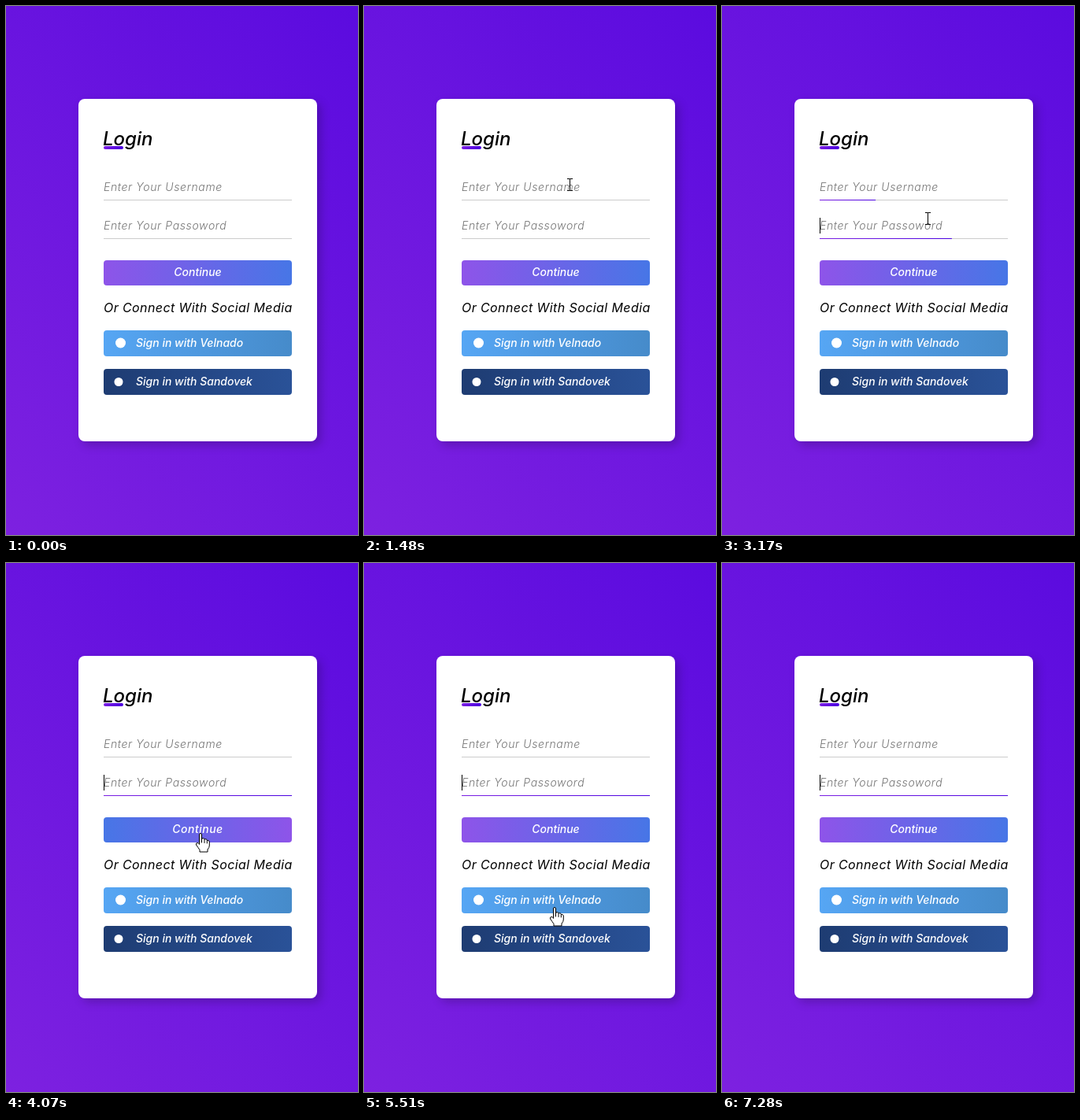
Recreate the animation shown at these times as an HTML page. Size 447 px wide and 672 px high, loop 7.42 s.

```html
<!DOCTYPE html>
<html lang="en">
<head>
<meta charset="utf-8">
<title>Login</title>
<style>
  html, body { margin: 0; width: 100%; height: 100%; overflow: hidden; }
  body { background: linear-gradient(45deg, #7d21e0, #5b0bdf); }
  svg { display: block; width: 447px; height: 672px; }
  text { font: italic 500 14px Inter, "Open Sans", sans-serif; fill: #fff; }
  .title { font-size: 24px; fill: #000; }
  .hint { font-weight: 300; fill: #757575; letter-spacing: .63px; }
  .social { font-size: 16px; font-weight: 400; fill: #000; letter-spacing: .41px; }
  .card { fill: #fff; filter: drop-shadow(5px 5px 6px rgba(0, 0, 0, .2)); }
  .shape { fill: #fff; stroke: #000; stroke-linejoin: round; stroke-linecap: round; }
</style>
</head>
<body>
<svg viewBox="0 0 447 672">
  <defs>
    <linearGradient id="line"><stop stop-color="#7a1fe2"/><stop offset="1" stop-color="#4a00e0"/></linearGradient>
    <linearGradient id="idle"><stop stop-color="#8e54e9"/><stop offset="1" stop-color="#4776e6"/></linearGradient>
    <linearGradient id="over"><stop stop-color="#4776e6"/><stop offset="1" stop-color="#8e54e9"/></linearGradient>
    <linearGradient id="sky"><stop stop-color="#56a6f4"/><stop offset="1" stop-color="#468bca"/></linearGradient>
    <linearGradient id="navy"><stop stop-color="#1e3c72"/><stop offset="1" stop-color="#2a5298"/></linearGradient>
  </defs>

  <rect class="card" x="92" y="118" width="303" height="435" rx="8"/>
  <rect x="124" y="178" width="25" height="4" rx="2" fill="url(#line)"/>
  <text class="title" x="123" y="177">Login</text>

  <text class="hint" x="124" y="235">Enter Your Username</text>
  <rect x="124" y="246" width="239" height="1" fill="#ccc"/>
  <rect id="userLine" x="124" y="246" height="1" fill="url(#line)"/>
  <text class="hint" x="124" y="284">Enter Your Passoword</text>
  <rect x="124" y="295" width="239" height="1" fill="#ccc"/>
  <rect id="passLine" x="124" y="295" height="1" fill="url(#line)"/>
  <rect id="caret" x="124" width="1" height="20"/>

  <rect id="button" x="124" y="323" width="239" height="32" rx="4"/>
  <text id="label" x="243.5" y="343" text-anchor="middle">Continue</text>
  <text class="social" x="124" y="389">Or Connect With Social Media</text>

  <rect x="124" y="412" width="239" height="33" rx="4" fill="url(#sky)"/>
  <circle cx="145.5" cy="428" r="6.5" fill="#fff"/>
  <text x="165" y="433">Sign in with Velnado</text>
  <rect x="124" y="461" width="239" height="33" rx="4" fill="url(#navy)"/>
  <circle cx="143" cy="477.5" r="5.5" fill="#fff"/>
  <text x="165" y="482">Sign in with Sandovek</text>

  <g id="cursor">
    <path id="arrow" class="shape" d="M.5 .5V16.5L4.2 13.2L6.6 18.5L9 17.5L6.7 12.2H11.5Z"/>
    <path id="beam" d="M-3 -7H0L.5 -6.5L1 -7H4V-6H1V8H4V9H1L.5 8.5L0 9H-3V8H0V-6H-3Z"/>
    <g id="hand">
      <path class="shape" d="M-1.5 14V2Q-1.5 .5 0 .5T1.5 2V8Q1.5 6.5 3.5 6.7T5 8.5Q5.5 7.3 7 7.8T8.3 9.6Q10.5 8.6 11.3 11V16Q11.3 18.5 9 21V24H-1V21.5Q-3 18.5 -5.5 15Q-6 12.5 -4 12.5Q-2.5 12.7 -1.5 14Z"/>
      <path class="shape" d="M1.5 8V12M5 9V12.5M8.3 10V13"/>
    </g>
  </g>
</svg>
<script>
  const LOOP = 7420, ENTER = 320, LEAVE = 7060;
  const USER_FOCUS = 1750, PASS_FOCUS = 2890;
  const HOVER_IN = 3670, HOVER_OUT = 4360;
  const BLINK = 545;

  // Pointer moves: start, end, x, y
  const moves = [
    [ENTER, 870, 290, 339], [870, 1280, 261, 226], [2270, 2500, 261, 269],
    [3480, 4070, 247, 343], [4270, 4760, 242, 428], [5450, 5720, 242, 466],
    [5920, 6260, 242, 479], [6530, LEAVE, 408, 692]
  ];

  const el = id => document.getElementById(id);
  const show = (id, on) => el(id).setAttribute("visibility", on ? "visible" : "hidden");
  const progress = (t, from, to) => Math.min(1, Math.max(0, (t - from) / (to - from)));
  const ramp = (t, from) => progress(t, from, from + 400);

  function pointerAt(t) {
    let x = 409, y = 658;
    for (const [from, to, toX, toY] of moves) {
      const p = progress(t, from, to);
      x += (toX - x) * p;
      y += (toY - y) * p;
    }
    return [Math.round(x), Math.round(y)];
  }

  function pointerKind(x, y) {
    const within = (top, bottom) => x >= 124 && x < 363 && y >= top && y < bottom;
    if (within(213, 248) || within(262, 297)) return "beam";
    if (within(323, 355) || within(412, 445) || within(461, 494)) return "hand";
    return "arrow";
  }

  function draw(t) {
    const [x, y] = pointerAt(t);
    const kind = t >= ENTER && t < LEAVE ? pointerKind(x, y) : "";
    for (const id of ["arrow", "beam", "hand"]) show(id, id === kind);
    el("cursor").setAttribute("transform", `translate(${x} ${y})`);

    const hover = kind === "hand" && y < 355;
    el("button").setAttribute("fill", hover ? "url(#over)" : "url(#idle)");
    el("label").style.letterSpacing = (ramp(t, HOVER_IN) - ramp(t, HOVER_OUT)) / 2 + "px";

    const user = ramp(t, USER_FOCUS), pass = ramp(t, PASS_FOCUS);
    el("userLine").setAttribute("width", 239 * (user - pass));
    el("passLine").setAttribute("width", 239 * pass);

    const inPass = t >= PASS_FOCUS;
    const focus = inPass ? PASS_FOCUS : USER_FOCUS;
    el("caret").setAttribute("y", inPass ? 269 : 220);
    show("caret", t >= focus && Math.floor((t - focus) / BLINK) % 2 === 0);
  }

  const start = performance.now();
  function frame() {
    draw((performance.now() - start) % LOOP);
    requestAnimationFrame(frame);
  }
  frame();
</script>
</body>
</html>
```
